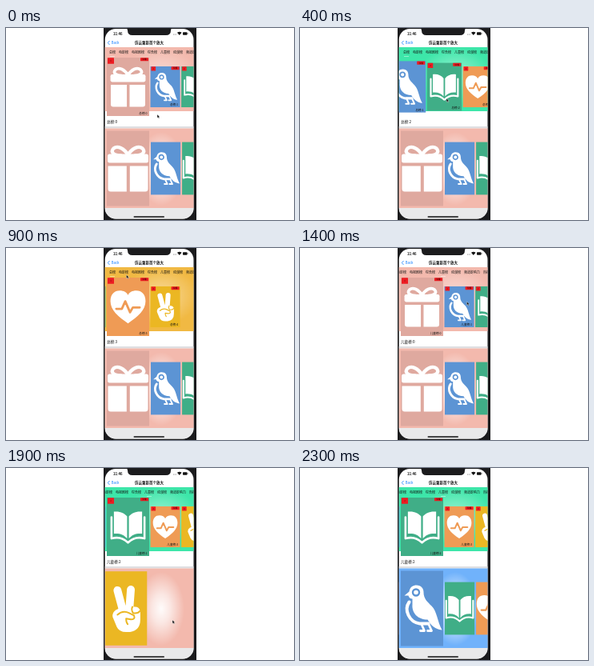
Write an HTML page that moves like this. It is 360 px wide and 240 px high and loops after 2.4 s.

```html
<!DOCTYPE html>
<html>
<head>
<meta charset="utf-8">
<title>Carousel demo</title>
<style>
html, body { margin: 0; width: 100%; height: 100%; overflow: hidden; background: #fff; }
svg { display: block; width: 360px; height: 240px; }
svg svg { width: auto; height: auto; }
text { font-family: "Noto Sans CJK SC", "Noto Sans CJK", "Noto Sans", sans-serif; fill: #111; }
.bold { font-weight: 700; }
.tab { font-size: 4px; font-weight: 500; }
.tag { font-size: 3.6px; font-weight: 500; text-anchor: end; }
.mini { font-size: 2.8px; fill: #5a0808; text-anchor: middle; }
.w { fill: #fff; }
.s { fill: none; stroke: #fff; stroke-linecap: round; stroke-linejoin: round; }
.c { fill: none; stroke: currentColor; stroke-linecap: round; stroke-linejoin: round; }
</style>
</head>
<body>
<svg viewBox="0 0 360 240">
  <defs>
    <clipPath id="screen"><rect x="123.700" y="1" width="110.800" height="237.500" rx="13.500"/></clipPath>
    <clipPath id="topArea"><rect x="123" y="24" width="112" height="80"/></clipPath>
    <clipPath id="lowArea"><rect x="123" y="125.500" width="112" height="99.500"/></clipPath>
    <radialGradient id="glow">
      <stop offset="0" stop-color="#fff" stop-opacity=".95"/>
      <stop offset=".4" stop-color="#fff" stop-opacity=".65"/>
      <stop offset="1" stop-color="#fff" stop-opacity="0"/>
    </radialGradient>

    <g id="gift">
      <path class="s" stroke-width="4.400" d="M0-17C-5-25-13-29-18-25C-23-20-17-16-9-16M0-17C5-25 13-29 18-25C23-20 17-16 9-16"/>
      <rect class="w" x="-25.500" y="-18" width="51" height="11" rx="2.500"/>
      <path class="w" d="M-25-3H-1.700V29H-21.500Q-25 29-25 25.500ZM2.300-3H25V25.500Q25 29 21.500 29H2.300Z"/>
    </g>
    <g id="bird">
      <path class="w" d="M-22-16L-16-21C-15-27-11-29-7-29C-1-29 2-25 2-20C2-12 7-8 12-3C19 4 19 16 25 27C16 26 11 21 7 14C-5 14-13 6-12-5L-12-12Q-16-12-17-16Z"/>
      <circle class="c" cx="-7.500" cy="-20" r="4" stroke-width="2.400"/>
      <path class="s" stroke-width="4" d="M-16-8C-23 2-16 17-3 19H8"/>
      <path class="s" stroke-width="2.800" d="M-1 19L3 28H-2M8 19L12 28H7"/>
    </g>
    <g id="book">
      <path class="s" stroke-width="3" d="M-24-14V17C-14 14-6 17 0 23C6 17 14 14 24 17V-14"/>
      <path class="w" d="M-20.500-22C-12-23-5-20-1.300-15V17C-6 11-13 9-20.500 10ZM20.500-22C12-23 5-20 1.300-15V17C6 11 13 9 20.500 10Z"/>
    </g>
    <g id="heart">
      <path class="w" d="M0 24C-14 15-25.500 5-25.500-8C-25.500-18-20-23.500-12-23.500C-6-23.500-2-21 0-17C2-21 6-23.500 12-23.500C20-23.500 25.500-18 25.500-8C25.500 5 14 15 0 24Z"/>
      <path class="c" stroke-width="3.300" d="M-17 3H-9L-4-8L3 8L7 1H17"/>
    </g>
    <g id="hand">
      <path class="s" stroke-width="10" d="M-11-23L-4 3M6-24L4 3"/>
      <path class="w" d="M-13 2Q-18 5-17 11L-12 23Q-9 30 0 30H5Q18 28 18 14V4Q17-2 11-2H-5Z"/>
      <path class="c" stroke-width="2" d="M-11 8Q-4 2 4 6L10 9Q12 14 6 14L0 13Q0 18 2 20M8-2Q6 2 9 6Q15 7 18 3"/>
    </g>
  </defs>

  <rect x="122" width="116" height="240" fill="#1b1b1d"/>
  <g clip-path="url(#screen)">
    <rect x="123" width="112" height="240" fill="#fff"/>
    <rect id="topBg" x="123" y="24" width="112" height="80"/>
    <ellipse cx="194" cy="60" rx="46" ry="36" fill="url(#glow)" opacity=".45" clip-path="url(#topArea)"/>
    <g id="tabs"></g>
    <g id="top"></g>
    <text id="caption" x="126" y="118.800" font-size="4.600" font-weight="500"></text>
    <rect x="123" y="123" width="112" height="2.500" fill="#dedfe1"/>
    <rect id="lowBg" x="123" y="125.500" width="112" height="99.500"/>
    <ellipse cx="194" cy="176" rx="29" ry="46" fill="url(#glow)" clip-path="url(#lowArea)"/>
    <g id="low"></g>
    <rect x="123" y="225" width="112" height="15" fill="#e9e9ea"/>
    <rect x="159.500" y="235.300" width="38.500" height="1.500" rx=".75" fill="#111"/>

    <text class="bold" x="134" y="8.800" font-size="4.300">11:46</text>
    <g fill="#111">
      <circle cx="209.500" cy="8" r=".4"/><circle cx="211" cy="8" r=".4"/><circle cx="212.500" cy="8" r=".4"/>
      <path d="M214 5.800Q216.800 3.600 219.600 5.800L216.800 9Z"/>
      <rect x="221" y="5.200" width="5.500" height="3.500" rx=".8"/><rect x="226.800" y="6.300" width=".6" height="1.300"/>
    </g>
    <path d="M129.500 16L127.300 18.500L129.500 21" fill="none" stroke="#0a7aff" stroke-width=".8"/>
    <text x="131.800" y="20.100" font-size="4.200" style="fill:#0a7aff">Back</text>
    <text class="bold" x="179" y="20.300" font-size="4.500" text-anchor="middle">仿云栗影首个放大</text>
  </g>
  <path d="M150 0H208Q206 1 206 3Q206 9 200 9H158Q152 9 152 3Q152 1 150 0Z" fill="#1b1b1d"/>
  <path id="cursor" d="M0 0V4.400L1.100 3.500L1.900 5.100L2.700 4.700L2 3.200H3.300Z" fill="#111" stroke="#fff" stroke-width=".35"/>
</svg>

<script>
const LOOP = 2400, STEP = 100, LEFT = 126, WIDE = 53, SHRINK = 0.3;
const $ = id => document.getElementById(id);

const icons = ["gift", "bird", "book", "heart", "hand"];
const fills = ["#dfa99f", "#5c94d4", "#40ae87", "#ef9b55", "#ebb723"];
const backs = ["#f3b9ad", "#70b2fb", "#3de6a9", "#f1b943", "#f3b9ad"];
const names = ["总榜", "电影榜", "电视剧榜", "综合榜", "儿童榜", "动漫榜", "频道影响力", "热搜榜"];

// [time, value...] points, joined by straight lines
const topPath = [[0, 0], [100, .3], [200, 1], [400, 1.4], [500, 2], [600, 2], [700, 2.6], [800, 3],
  [999, 3], [1000, 0], [1400, 0], [1500, .7], [1600, 1.7], [1700, 2]];
const lowPath = [[0, 0], [1500, 0], [1600, .3], [1700, .83], [1800, 2.6], [1900, 4.05], [2000, 4],
  [2100, 3], [2200, 1.6], [2300, 1]];
const mousePath = [[0, 189, 108], [100, 205, 85], [200, 180, 85], [300, 200, 88], [400, 183, 88],
  [500, 165, 90], [600, 205, 85], [700, 170, 85], [800, 153, 50], [900, 150.5, 33.5], [1000, 151, 31],
  [1200, 198, 31], [1400, 208.5, 67], [1600, 200, 130], [1700, 177.5, 182], [1800, 165, 186],
  [1900, 208, 190], [2200, 222, 182]];
const picks = [[0, 0], [1000, 1], [1100, 3], [1200, 4]];

function at(path, t) {
  const i = path.findIndex(p => p[0] > t);
  if (i < 0) return path[path.length - 1].slice(1);
  const a = path[i - 1], b = path[i], u = (t - a[0]) / (b[0] - a[0]);
  return a.slice(1).map((v, j) => v + (b[j + 1] - v) * u);
}

let tabX = 129;
const tabs = names.map(name => {
  const tab = { name, x: tabX, w: name.length * 4 };
  tabX += tab.w + 4;
  return tab;
});
$("tabs").innerHTML = tabs.map(t => `<text class="tab" x="${t.x}" y="32.1">${t.name}</text>`).join("") +
  `<rect id="mark" y="35" width="6" height=".7" fill="#fff" opacity=".6"/>`;

const focusIndex = f => Math.max(0, Math.min(4, Math.ceil(f - .3)));

// The front card is full size; its neighbours shrink as they leave the slot.
function place(focus, gap) {
  const k = Math.floor(focus), split = LEFT + (1 - focus + k) * (WIDE + gap);
  const size = i => 1 - SHRINK * Math.min(1, Math.abs(i - focus));
  const cards = [];
  for (let i = k, right = split - gap; i >= 0; i--) {
    const w = WIDE * size(i);
    cards.push({ i, s: size(i), w, x: right - w });
    right -= w + gap;
  }
  for (let i = k + 1, x = split; i < icons.length; i++) {
    const w = WIDE * size(i);
    cards.push({ i, s: size(i), w, x });
    x += w + gap;
  }
  return cards.filter(c => c.x < 236 && c.x + c.w > 122);
}

function badges(c, y, h, label) {
  const r = c.x + c.w, bw = 8 * c.s, bh = 7.5 * c.s;
  return `<rect x="${c.x + 1}" y="${y + .3}" width="${bw}" height="${bh}" rx=".6" fill="#ed1c22"/>
    <text class="mini" x="${c.x + 1 + bw / 2}" y="${y + bh / 2 + 1.3}">${c.i}</text>
    <rect x="${r - 11}" y="${y + .2}" width="10" height="4.1" rx=".5" fill="#ed1c22"/>
    <text class="mini" x="${r - 6}" y="${y + 3.2}">独播</text>
    <text class="tag" x="${r - 2.5}" y="${y + h - 2}">${label}:${c.i}</text>`;
}

function row(focus, gap, mid, tall, zoom, label) {
  return place(focus, gap).map(c => {
    const h = tall * c.s, y = mid - h / 2, k = zoom * c.s;
    return `<g color="${fills[c.i]}"><rect x="${c.x}" y="${y}" width="${c.w}" height="${h}" fill="currentColor"/>
      <use href="#${icons[c.i]}" transform="translate(${c.x + c.w / 2} ${mid}) scale(${k})"/></g>` +
      (label ? badges(c, y, h, label) : "");
  }).join("");
}

function draw(t) {
  const [a] = at(topPath, t), [b] = at(lowPath, t), [mx, my] = at(mousePath, t);
  const tab = tabs[picks.filter(p => p[0] <= t).pop()[1]];
  const scroll = Math.max(0, tab.x + tab.w / 2 - 179);
  $("tabs").setAttribute("transform", `translate(${-scroll} 0)`);
  $("mark").setAttribute("x", tab.x + tab.w / 2 - 3);
  $("topBg").setAttribute("fill", backs[focusIndex(a)]);
  $("lowBg").setAttribute("fill", backs[focusIndex(b)]);
  $("caption").textContent = `${tab.name}:${focusIndex(a)}`;
  $("top").innerHTML = row(a, 1.5, 73.5, 73, .86, tab.name);
  $("low").innerHTML = row(b, 2, 175.5, 94, 1, "");
  $("cursor").setAttribute("transform", `translate(${mx} ${my})`);
  $("cursor").style.display = t < 2300 ? "" : "none";
}

const start = performance.now();
let last = -1;
function tick() {
  const t = Math.floor((performance.now() - start) % LOOP / STEP) * STEP;
  if (t !== last) draw(last = t);
  requestAnimationFrame(tick);
}
tick();
</script>
</body>
</html>
```
